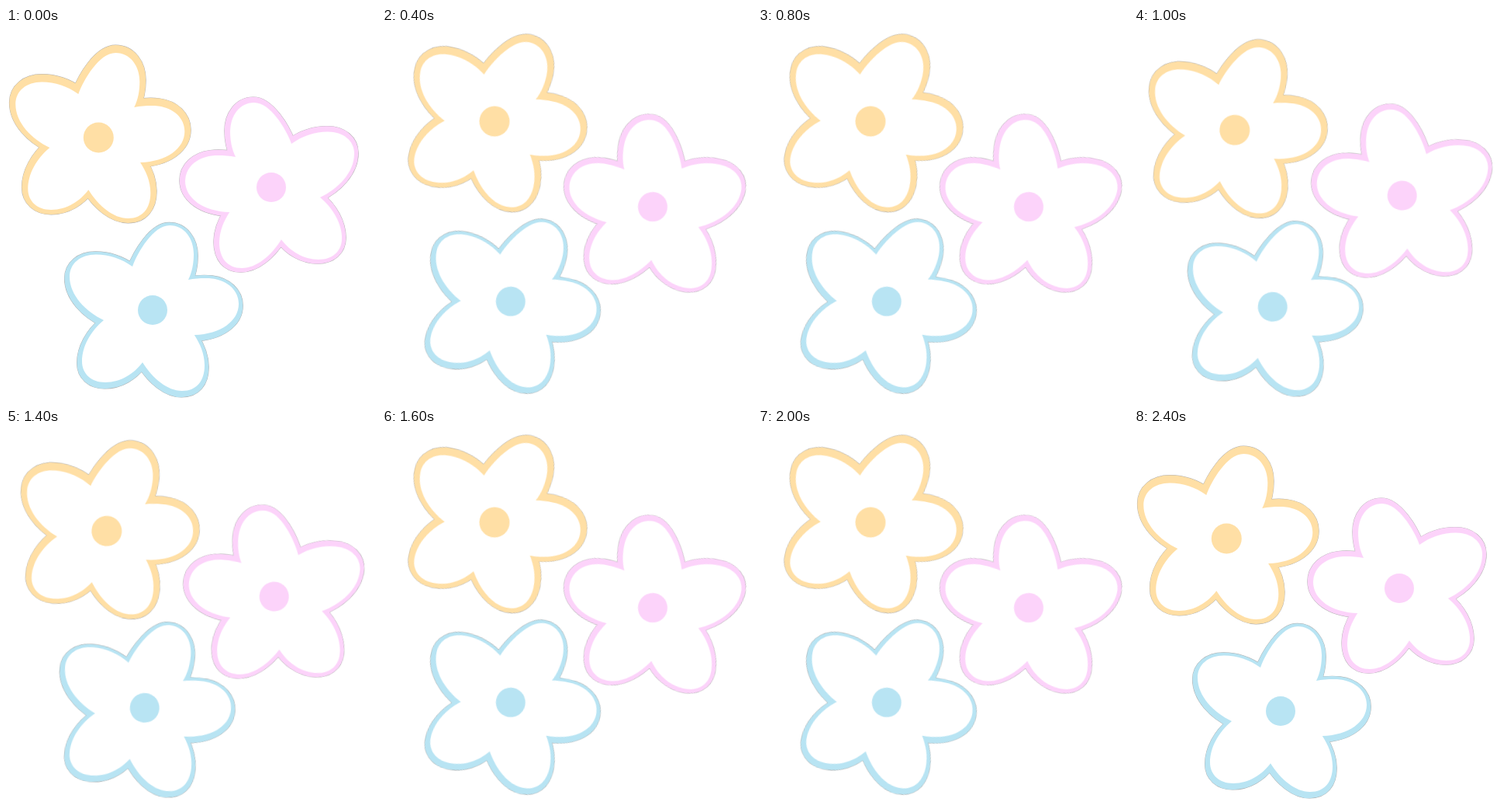
An HTML page that plays this animation: 477 by 480 pixels, repeating every 2600 ms.

```html
<!DOCTYPE html>
<html lang="en">
<head>
<meta charset="utf-8">
<title>Flowers</title>
<style>
  html, body { margin: 0; width: 100%; height: 100%; overflow: hidden; background: #fff; }
  svg { display: block; width: 100%; height: 100%; }
  #bunch { transform-origin: 229px 250px; }
</style>
</head>
<body>
<svg viewBox="0 0 477 480">
  <defs>
    <path id="petals" d="
      M-26-56 C-19-75 1-109 22-109 C41-109 53-92 53-72 C53-60 51-49 46-39
      C57-41 69-41.5 77-40.5 C97-38 111-25 111-8 C111 14 88 31 53.8 32
      C61 43 67 56 67 71 C67 91 57 104 38 104 C19 104 0 88-13 67.3
      C-24 82-41 93-61 93 C-79 93-91 82-91 66 C-91 47-80 27-63 13
      C-86 2-107-19-107-43 C-107-60-93-71.5-73-71.5 C-56-71.5-40-66-26-56 Z"/>
  </defs>
  <g id="bunch"></g>
</svg>
<script>
const bunch = document.getElementById('bunch');

// rim: outline thickness; dx, dy: how far the rim sits off the white petals
const flowers = [
  { x: 119.3, y: 141, r: 19.5, color: '#ffdfa5', rim: 8, dx: 0, dy: -2, flip: 1 },
  { x: 342, y: 205, r: 19, color: '#fcd3fa', rim: 6.3, dx: 1, dy: -0.9, flip: -1 },
  { x: 189, y: 363, r: 19, color: '#b8e4f3', rim: 6, dx: -0.6, dy: 2.2, flip: 1 }
];

const flower = f => {
  const rim = (color, extra) => `<use href="#petals" transform="translate(${f.dx} ${f.dy})"
    fill="${color}" stroke="${color}" stroke-width="${2 * f.rim + extra}" stroke-linejoin="round"/>`;
  return `<g transform="translate(${f.x} ${f.y}) scale(${f.flip} 1)">
    <g opacity=".4">${rim('#333', 0.8)}</g>
    ${rim(f.color, 0)}
    <use href="#petals" fill="#fff"/>
    <circle r="${f.r}" fill="${f.color}"/>
  </g>`;
};

bunch.innerHTML = flowers.map(flower).join('');

// The bunch rocks about one pivot in held poses of 200 ms.
const angles = [0, 5.3, 12.3, 19.3];
const poses = [0, 1, 2, 3, 2, 1, 0, 1, 2, 3, 2, 1, 0];
const frames = [...poses, 0].map((p, i) => ({
  offset: i / poses.length,
  transform: `rotate(${angles[p]}deg)`,
  easing: 'step-end'
}));
bunch.animate(frames, { duration: 200 * poses.length, iterations: Infinity });
</script>
</body>
</html>
```
